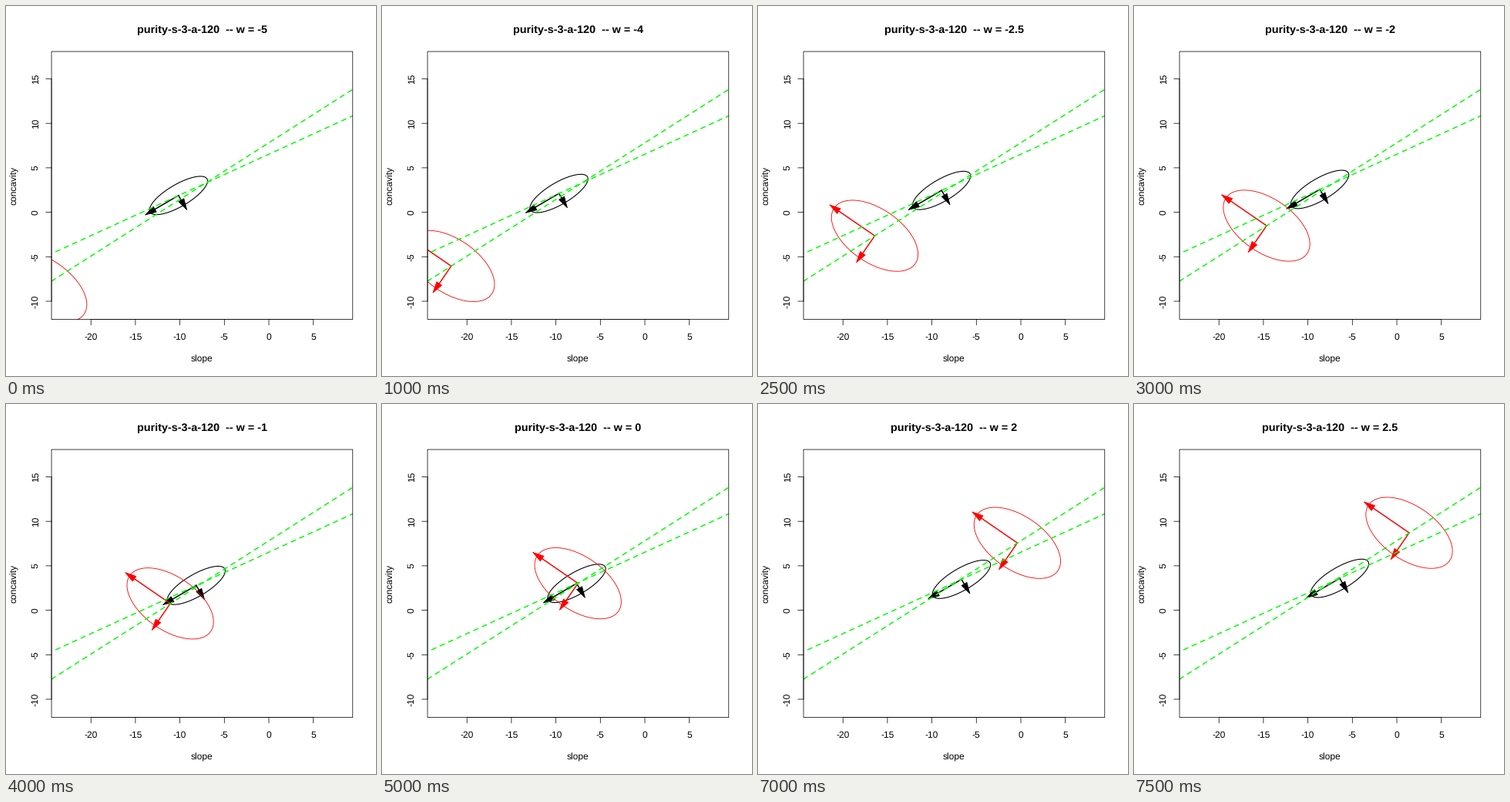
These frames come from a looping animation (480 by 480 pixels, 8000 ms). A matplotlib script:

```python
import numpy as np
import matplotlib.pyplot as plt
from matplotlib.animation import FuncAnimation
from matplotlib.patches import Rectangle

plt.rcParams["font.family"] = "Liberation Sans"
plt.rcParams["text.hinting"] = "none"

SIZE = 480
FRAMES, INTERVAL = 16, 500
LEFT, RIGHT, TOP, BOTTOM = 59.04, 449.76, 59.04, 406.56
UNIT, X0, Y0 = 11.54, 341.0, 267.6
GREEN = "#00ff00"
HEAD_LEN, HEAD_WIDTH = 14.6, 8.0

# At 72 dpi one point equals one pixel.
fig = plt.figure(figsize=(SIZE / 72, SIZE / 72), dpi=72, facecolor="white")
ax = fig.add_axes([0, 0, 1, 1])
ax.set_xlim(0, SIZE)
ax.set_ylim(SIZE, 0)
ax.axis("off")
frame_box = Rectangle((LEFT, TOP), RIGHT - LEFT, BOTTOM - TOP, fill=False,
                      ec="black", lw=0.75, snap=False, zorder=8)
ax.add_patch(frame_box)


def line(xs, ys, color="black", lw=0.75, **kw):
    return ax.plot(xs, ys, color=color, lw=lw, snap=False, **kw)[0]


def label(x, y, text, size=12, **kw):
    return ax.text(x, y, text, fontsize=size, ha="center", va="baseline",
                   rotation_mode="anchor", **kw)


# Arrowhead pointing along +x, centred on its length
HEAD = np.array([[0.5, 0], [-0.5, 0.5], [-0.5, -0.5]]) * [HEAD_LEN, HEAD_WIDTH]


class Blob:
    """Ellipse with arrows along its two half axes, sliding along a line."""

    def __init__(self, color, start, step, axes, ring_lw, z):
        self.start, self.step = np.array(start), np.array(step)
        self.axes = [np.array(v) for v in axes]
        t = np.linspace(0, 2 * np.pi, 200)
        self.ring_pts = (np.outer(np.cos(t), self.axes[0])
                         + np.outer(np.sin(t), self.axes[1]))
        self.ring = line([], [], color, ring_lw, zorder=z)
        self.shafts, self.heads = [], []
        for _ in self.axes:
            self.shafts.append(line([], [], color, 1.5, zorder=z + 0.1))
            self.heads.append(ax.fill([0, 1, 0], [0, 0, 1], fc=color, ec=color,
                                      lw=0.75, joinstyle="round", snap=False,
                                      zorder=z + 0.2)[0])
        for part in [self.ring, *self.shafts, *self.heads]:
            part.set_clip_path(frame_box)

    def move(self, w):
        c = self.start + w * self.step
        self.ring.set_data(*(self.ring_pts + c).T)
        for v, shaft, head in zip(self.axes, self.shafts, self.heads):
            end = c + v
            shaft.set_data([c[0], end[0]], [c[1], end[1]])
            u = v / np.hypot(*v)
            head.set_xy(HEAD @ np.array([u, [-u[1], u[0]]]) + end)


def polar(length, degrees):
    a = np.radians(degrees)
    return length * np.cos(a), length * np.sin(a)


# Axes
x_ticks, y_ticks = range(-20, 6, 5), range(-10, 16, 5)
line([X0 - 20 * UNIT, X0 + 5 * UNIT], [BOTTOM] * 2, zorder=8)
line([LEFT] * 2, [Y0 + 10 * UNIT, Y0 - 15 * UNIT], zorder=8)
for v in x_ticks:
    x = X0 + v * UNIT
    line([x, x], [BOTTOM, BOTTOM + 7.2], zorder=8)
    label(x, 433, str(v))
for v in y_ticks:
    y = Y0 - v * UNIT
    line([LEFT, LEFT - 7.2], [y, y], zorder=8)
    label(41.8, y, str(v), rotation=90)
label(254.4, 461.6, "slope")
label(13.8, 232.8, "concavity", rotation=90)
title = label(254.4, 35, "", 14.4, fontweight="bold")

# Paths of the two ellipses; dash lengths are in line widths
for y_start, y_end, phase in ((357, 108.2, 0), (321.3, 142.5, 4)):
    path = line([LEFT, RIGHT], [y_start, y_end], GREEN, 1.5, zorder=5,
                linestyle=(phase, (4, 4)), dash_capstyle="round")
    path.set_clip_path(frame_box)

blobs = [
    Blob("black", (252.5, 232.7), (5.74, -2.62),
         (polar(42.8, 149.7), polar(14.3, 59.7)), 1.1, 2),
    Blob("red", (254.2, 232.6), (41.1, -26.2),
         (polar(63.8, 214.5), polar(34.8, 124.5)), 0.85, 3),
]


def update(i):
    w = -5 + 0.5 * i
    title.set_text(f"purity-s-3-a-120  -- w = {w:g}")
    for blob in blobs:
        blob.move(w)
    return []


anim = FuncAnimation(fig, update, frames=FRAMES, interval=INTERVAL,
                     repeat=True, repeat_delay=0, blit=False)
plt.show()
```
